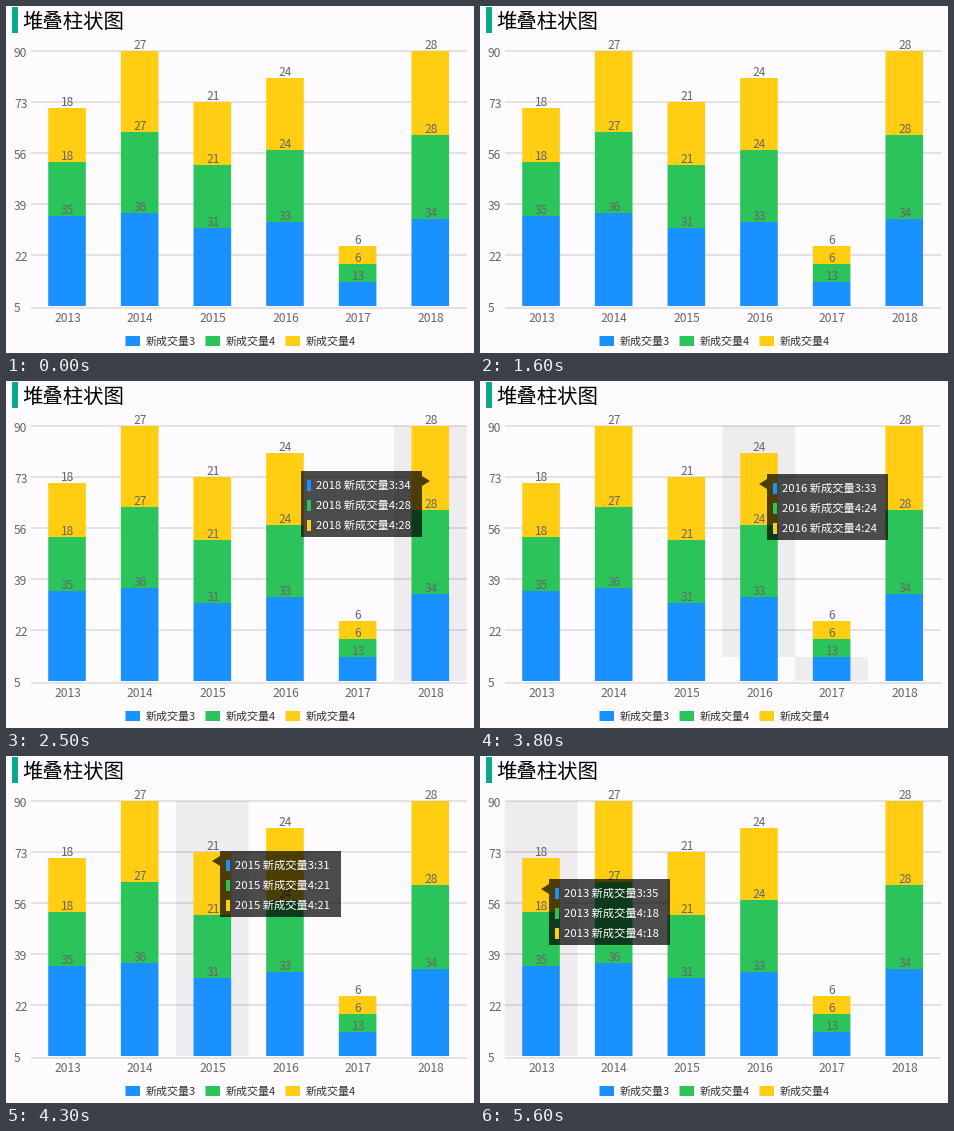
Recreate the animation shown at these times as a matplotlib script. Size 468 px wide and 347 px high, loop 6.8 s.

```python
import matplotlib.pyplot as plt
from matplotlib.animation import FuncAnimation
from matplotlib.patches import Polygon, Rectangle

W, H, DPI = 468, 347, 64
STEP = 100
LOOP = 6800

BG, INK, GREY = "#fefbff", "#000000", "#666666"
COLORS = ["#1991ff", "#2bc45b", "#ffce12"]
NAMES = ["新成交量3", "新成交量4", "新成交量4"]
YEARS = range(2013, 2019)
VALUES = [(35, 18, 18), (36, 27, 27), (31, 21, 21),
          (33, 24, 24), (13, 6, 6), (34, 28, 28)]

LEFT, RIGHT, TOP, BASE = 24.7, 460.6, 45, 300
SLOT = (RIGHT - LEFT) / len(VALUES)
UNIT, FLOOR = 3, 5
BAR_W = 37.6
TIP_W, TIP_H, ARROW = 121, 66, 8

# start in ms, column, tooltip top, tooltip on the right, repainted down to y
HOVERS = [(2500, 5, 90, False, BASE), (3200, 4, 92, False, BASE),
          (3800, 3, 93, True, 276), (4300, 2, 95, True, BASE),
          (4900, 1, 109, True, BASE), (5600, 0, 123, True, BASE)]
BLANK = (1400, 1600)

plt.rcParams["font.family"] = "Noto Sans CJK JP"
fig = plt.figure(figsize=(W / DPI, H / DPI), dpi=DPI, facecolor=BG)
ax = fig.add_axes([0, 0, 1, 1])
ax.set_xlim(0, W)
ax.set_ylim(H, 0)
ax.axis("off")


def rect(x, y, w, h, color, z=1, alpha=1, snap=True):
    return ax.add_patch(Rectangle((x, y), w, h, fc=color, lw=0, zorder=z,
                                  alpha=alpha, snap=snap))


def text(x, y, s, px, color, z=4, ha="left"):
    return ax.text(x, y, s, fontsize=px * 72 / DPI, color=color,
                   ha=ha, va="baseline", zorder=z)


def center(i):
    return LEFT + SLOT * (i + 0.5)


def grid(color):
    ys = [*range(TOP - 1, BASE - 1, 51), BASE + 1]
    return [rect(LEFT, y, RIGHT - LEFT, 2, color) for y in ys]


def bars(colors):
    out = []
    for i, stack in enumerate(VALUES):
        y = BASE + FLOOR * UNIT
        for value, color in zip(stack, colors):
            top = y - value * UNIT
            out.append(rect(center(i) - BAR_W / 2, top, BAR_W,
                            min(y, BASE) - top, color, 3, snap=False))
            y = top
    return out


def labels(color):
    out = [text(8, TOP + 51 * k + 6, str(90 - 17 * k), 12, color)
           for k in range(6)]
    for i, (year, stack) in enumerate(zip(YEARS, VALUES)):
        x = center(i) + 0.5
        out.append(text(x, 316, str(year), 12, color, ha="center"))
        total = -FLOOR
        for value in stack:
            total += value
            out.append(text(x, BASE - total * UNIT - 2, str(value), 12,
                            color, ha="center"))
    return out


def legend(colors, ink):
    out = []
    for k, (name, color) in enumerate(zip(NAMES, colors)):
        x = 119.5 + 80 * k
        out += [rect(x, 330, 14.5, 10, color, snap=False),
                text(x + 20, 339, name, 11, ink)]
    return out


def chart(line, colors, ink, legend_ink):
    return grid(line) + bars(colors) + labels(ink) + legend(colors, legend_ink)


def shade(i, top, bottom):
    return rect(LEFT + SLOT * i, top, SLOT, bottom - top, "black", 2, 0.06,
                snap=False)


def tooltip(i, top, on_right):
    tip = round(center(i))
    edge = tip + ARROW if on_right else tip - ARROW
    x = edge if on_right else edge - TIP_W
    arrow = Polygon([(tip, top + 10), (edge, top + 5), (edge, top + 15)],
                    fc="black", lw=0, alpha=0.7, zorder=5)
    out = [rect(x, top, TIP_W, TIP_H, "black", 5, 0.7), ax.add_patch(arrow)]
    for k, (name, color) in enumerate(zip(NAMES, COLORS)):
        y = top + 14 + 20 * k
        line = f"{YEARS[i]} {name}:{VALUES[i][k]}"
        out += [rect(x + 6, y - 5, 4, 11, color, 6),
                text(x + 15, y + 4, line, 11.3, "white", 7)]
    return out


def hover(col, top, on_right, painted):
    # an unfinished repaint leaves the foot of the previous column shaded
    shades = [shade(col, TOP, painted)]
    if painted < BASE:
        shades.append(shade(col + 1, painted, BASE))
    return shades + tooltip(col, top, on_right)


rect(6, 1, 6, 26, "#0aa78f")
text(16, 22, "堆叠柱状图", 20.4, INK)

full = chart("#e4e0e4", COLORS, GREY, "#333333")
ghost = chart("#fffdff", ["white"] * 3, "white", "white")
hovers = [hover(*h[1:]) for h in HOVERS]


def show(artists, on):
    for a in artists:
        a.set_visible(on)


def update(n):
    t = n * STEP
    blank = BLANK[0] <= t < BLANK[1]
    show(full, not blank)
    show(ghost, blank)
    current = sum(t >= h[0] for h in HOVERS) - 1
    for k, group in enumerate(hovers):
        show(group, k == current)
    return []


anim = FuncAnimation(fig, update, frames=LOOP // STEP, interval=STEP,
                     repeat=True, repeat_delay=0, blit=False)
plt.show()
```
